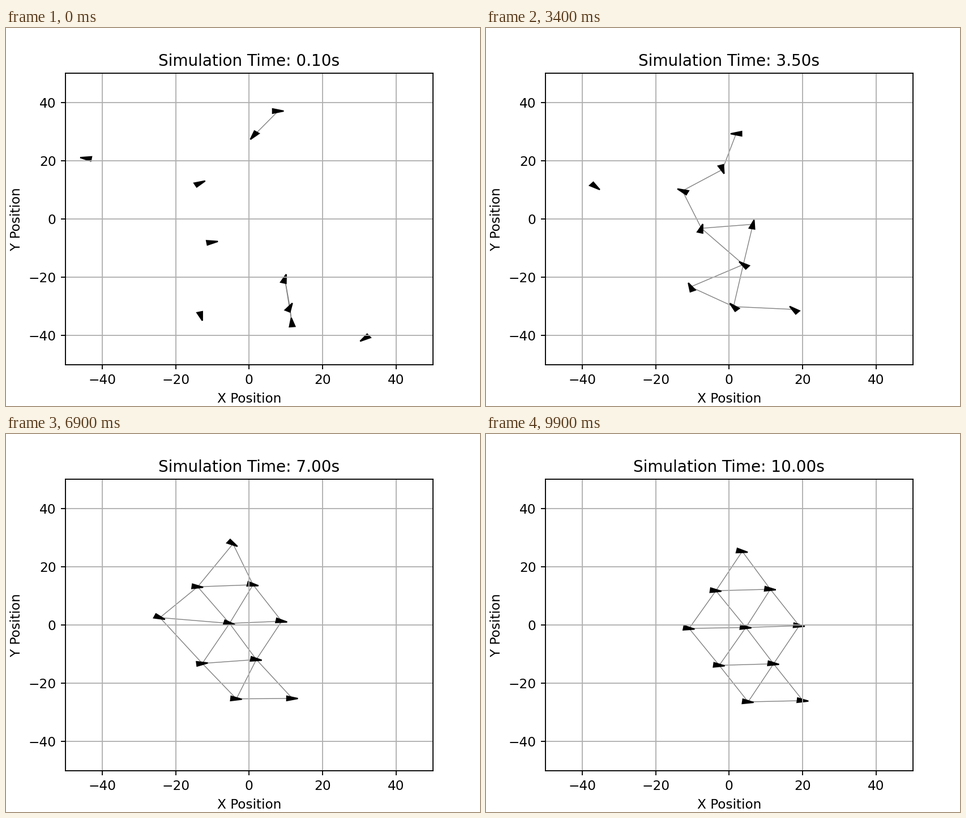
A matplotlib script for the animation above (10 s loop, 837 by 669 pixels).

```python
import matplotlib.pyplot as plt
import numpy as np
from matplotlib.animation import FuncAnimation
from matplotlib.collections import LineCollection
from matplotlib.patches import Polygon

W, H, DPI = 837, 669, 167.4
FRAMES, STEP, SUBSTEPS = 100, 0.1, 10
LINK_RANGE = 19.5
SPACING, TILT = 14.8, np.radians(2)
START_SPEED, PULL, DRAG = 5.0, 7.5, 1.7
PUSH, PUSH_RANGE = 14.0, 14.0
OPEN_TIME = 3.5

# Each agent: start x, start y, heading in degrees, lattice place (a, b).
AGENTS = np.array([
    (7.9, 37.1, 0, -1, 2),
    (1.2, 28.6, -125, 0, 1),
    (-44.5, 20.9, 171, -1, 0),
    (-13.3, 12.4, 28, -1, 1),
    (-10.0, -7.9, 9, 0, 0),
    (9.7, -20.4, 75, 1, 0),
    (11.1, -30.2, 64, 1, -1),
    (11.6, -35.4, 95, 1, -2),
    (-13.1, -33.4, -76, 0, -1),
    (31.4, -41.0, -142, 2, -2),
])
x0, y0, heading, a, b = AGENTS.T

# Points are complex numbers; the flock settles on a triangular lattice.
SLOT = SPACING * np.exp(1j * TILT) * (a + b * np.exp(1j * np.pi / 3))
SOFTNESS = 3 + 0.35 * abs(SLOT)


def centre(t):
    """The flock lingers left of the middle, then cruises to the right."""
    keys = [0, 1.6, 5.4, 6.4, 9.9]
    return (np.interp(t, keys, [-5, -5, -8, -6, 4.5])
            + 1j * np.interp(t, keys, [-3, -3, 0.8, 0.4, -0.8]))


def soft_sign(z, width):
    return (z.real / np.hypot(z.real, width)
            + 1j * z.imag / np.hypot(z.imag, width))


def repulsion(pos):
    gap = pos[:, None] - pos
    dist = abs(gap) + 1e6 * np.eye(len(pos))
    force = PUSH * np.clip(1 - (dist / PUSH_RANGE) ** 4, 0, None)
    return (force * gap / dist).sum(axis=1)


def simulate():
    """Positions and velocities of all agents for every frame."""
    pos = x0 + 1j * y0
    vel = START_SPEED * np.exp(1j * np.radians(heading))
    dt = STEP / SUBSTEPS
    path = []
    for n in range(FRAMES * SUBSTEPS):
        if n % SUBSTEPS == 0:
            path.append((pos, vel))
        t = n * dt
        mid = centre(t)
        drift = (centre(t + dt) - mid) / dt
        goal = mid + SLOT * min(t / OPEN_TIME, 1)
        acc = (PULL * soft_sign(goal - pos, SOFTNESS)
               - DRAG * (vel - drift) + repulsion(pos))
        vel = vel + acc * dt
        pos = pos + vel * dt
    return path


def xy(z):
    return np.stack([np.real(z), np.imag(z)], axis=-1)


def triangle(pos, vel, length=3.0, width=1.5):
    u = vel / max(abs(vel), 1e-9)
    shape = np.array([-length + 1j * width, length, -length - 1j * width]) / 2
    return xy(pos + u * shape)


PATH = simulate()

# The small margin keeps float rounding from losing a pixel.
fig, ax = plt.subplots(figsize=((W + 0.001) / DPI, (H + 0.001) / DPI), dpi=DPI)
fig.subplots_adjust(left=105 / W, right=753.7 / W, top=1 - 80.5 / H, bottom=1 - 596 / H)
ax.set_xlim(-50, 50)
ax.set_ylim(-50, 50)
ax.set_xlabel("X Position")
ax.set_ylabel("Y Position")
ax.grid(True)
title = ax.set_title("")

agents = [ax.add_patch(Polygon(np.zeros((3, 2)), closed=True, fc="k", ec="k", lw=1))
          for _ in AGENTS]
links = LineCollection([], colors="gray", linewidths=0.6, zorder=0.9)
ax.add_collection(links, autolim=False)


def update(i):
    pos, vel = PATH[i]
    for agent, p, v in zip(agents, pos, vel):
        agent.set_xy(triangle(p, v))
    near = abs(pos[:, None] - pos) < LINK_RANGE
    links.set_segments([xy(pos[pair]) for pair in np.argwhere(np.triu(near, 1))])
    title.set_text(f"Simulation Time: {(i + 1) * STEP:.2f}s")
    return [*agents, links, title]


anim = FuncAnimation(fig, update, frames=FRAMES, interval=100, repeat=True, blit=False)
plt.show()
```
